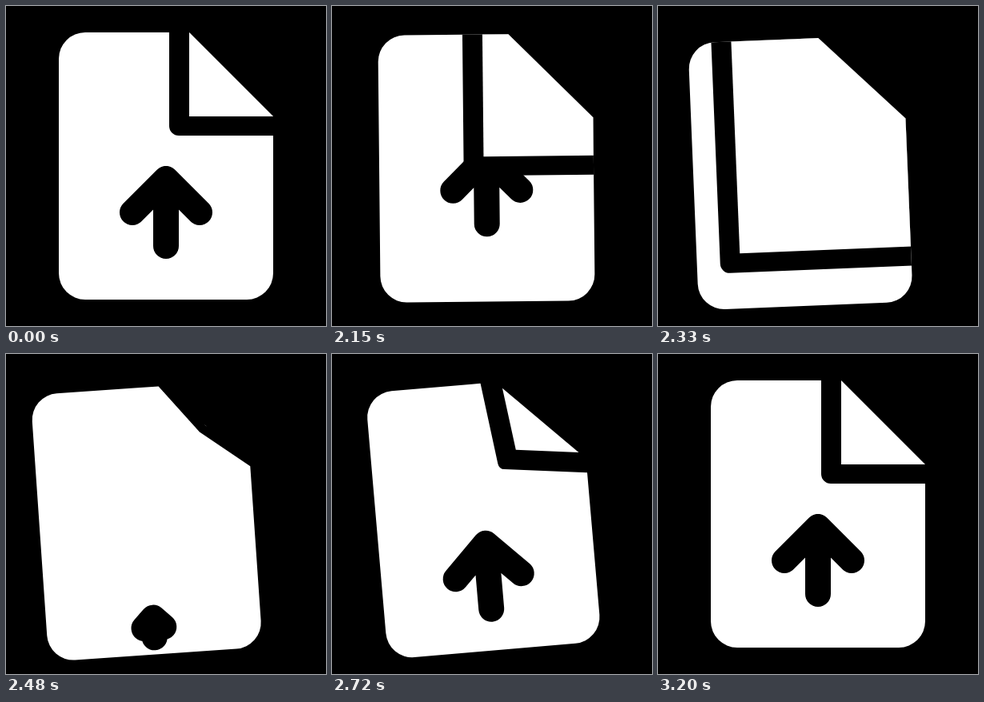
An HTML page with a canvas for the animation above (3.23 s loop, 400x400 px).

```html
<!DOCTYPE html>
<html>
<head>
<meta charset="utf-8">
<style>
html, body { margin: 0; height: 100%; overflow: hidden; background: #000; }
canvas { display: block; }
</style>
</head>
<body>
<canvas id="stage" width="400" height="400"></canvas>
<script>
const ctx = document.getElementById('stage').getContext('2d');
const LOOP = 3230, HOLD = 2000, MOVE = 1200;

const clamp = x => Math.min(1, Math.max(0, x));
const span = (t, from, to) => clamp((t - from) / (to - from));
const ease = x => (1 - Math.cos(Math.PI * x)) / 2;
const mix = (a, b, k) => a + (b - a) * k;

function polygon(points, color) {
  ctx.beginPath();
  for (const [x, y] of points) ctx.lineTo(x, y);
  ctx.closePath();
  ctx.fillStyle = color;
  ctx.fill();
}

// Sheet outline; the cut corner sinks inward as fold goes from 0 to 1.
function sheetPath(fold) {
  const cx = mix(281.5, 204, fold), cy = mix(85.5, 162, fold);
  const right = mix(138, 162, fold);
  ctx.beginPath();
  ctx.moveTo(200, 33);
  ctx.lineTo(mix(229, 204, fold), 33);
  ctx.arcTo(cx, cy, 334, right, 12 * fold);
  ctx.lineTo(334, right);
  ctx.arcTo(334, 367, 66, 367, 33);
  ctx.arcTo(66, 367, 66, 33, 33);
  ctx.arcTo(66, 33, 200, 33, 33);
  ctx.closePath();
}

function arrow(bottom, scale) {
  const top = bottom - 84 * scale, wing = 42 * scale;
  ctx.beginPath();
  ctx.moveTo(200 - wing, top + wing);
  ctx.lineTo(200, top);
  ctx.lineTo(200 + wing, top + wing);
  ctx.moveTo(200, top);
  ctx.lineTo(200, bottom + 0.01);
  ctx.strokeStyle = '#000';
  ctx.lineWidth = 32;
  ctx.lineCap = ctx.lineJoin = 'round';
  ctx.stroke();
}

// The flap sweeps to the lower left until it covers the whole sheet.
function sweepFlap(t) {
  const shift = t < 150 ? t * t / 703 : 32 + (t - 150) * 0.425;
  const x = 229 - shift, y = 138 + 1.47 * shift;
  ctx.beginPath();
  ctx.moveTo(x - 25, 0);
  ctx.arcTo(x - 25, y + 24, 400, y + 24, 12);
  ctx.lineTo(400, y + 24);
  ctx.lineTo(400, 0);
  ctx.fillStyle = '#000';
  ctx.fill();
  polygon([[x, 0], [x, y], [400, y], [400, 0]], '#fff');
}

// A fresh corner grows out of the middle of the diagonal.
function newCorner(fold) {
  const grow = clamp((fold - 0.1) / 0.9);
  const half = 52.5 * Math.sqrt(grow), depth = 52.5 * grow ** 1.25;
  polygon([
    [281.5 - half, 85.5 - half],
    [281.5 - depth, 85.5 + depth],
    [281.5 + half, 85.5 + half]
  ], '#fff');
}

function draw(t) {
  const fold = 1 - (1 - span(t, 455, MOVE)) ** 3;
  const tilt = 5 * (t < 690 ? ease(t / 690) : 1 - ease(span(t, 690, 1120)));
  const sway = Math.sin(Math.PI * span(t, 0, 800)) ** 2;

  ctx.fillStyle = '#000';
  ctx.fillRect(0, 0, 400, 400);
  ctx.save();
  ctx.translate(235 - 19 * sway, 305 + 7 * sway);
  ctx.rotate(-tilt * Math.PI / 180);
  ctx.translate(-235, -305);

  ctx.save();
  sheetPath(fold);
  ctx.fillStyle = '#fff';
  ctx.fill();
  ctx.clip();
  if (t < 470) {
    arrow(300 - 0.2 * t, 1);
    sweepFlap(t);
  }
  if (t > 330) {
    const decay = u => Math.exp((330 - u) / 260);
    const drop = 90.8 * Math.max(0, decay(t) - decay(1080));
    arrow(300 + drop, ease(span(t, 320, 760)));
  }
  ctx.restore();

  newCorner(fold);
  ctx.restore();
}

function tick() {
  const t = performance.now() % LOOP - HOLD;
  draw(Math.min(MOVE, Math.max(0, t)));
  requestAnimationFrame(tick);
}
tick();
</script>
</body>
</html>
```
